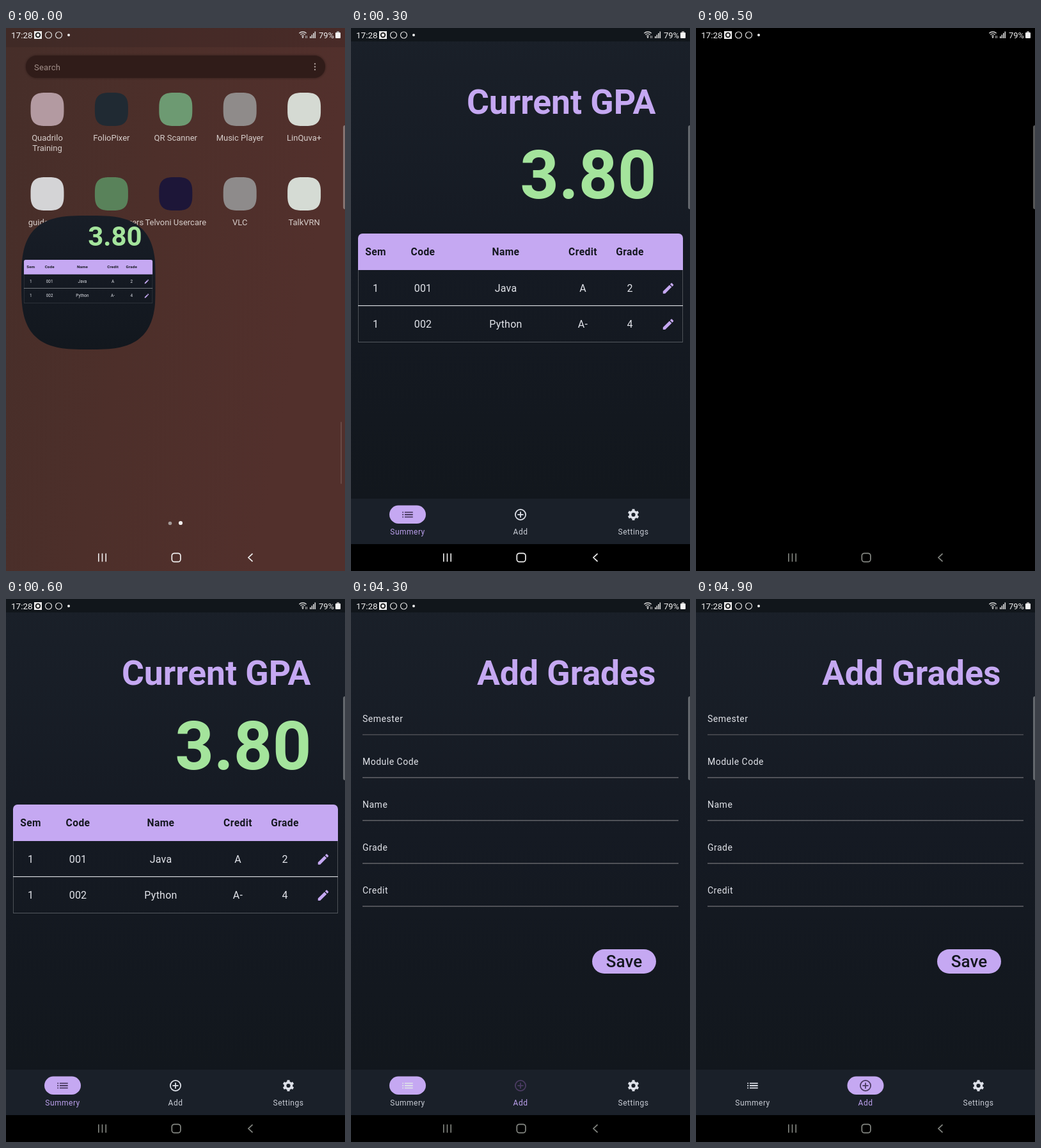
Write an HTML page with a canvas that moves like this. It is 530 px wide and 848 px high and loops after 5.3 s.

```html
<!DOCTYPE html>
<html lang="en">
<head>
<meta charset="utf-8">
<title>GPA calculator</title>
<style>
html, body { margin: 0; width: 100%; height: 100%; overflow: hidden; background: #000; }
canvas { display: block; width: 530px; height: 848px; }
</style>
</head>
<body>
<canvas id="stage"></canvas>
<script>
const W = 530, H = 848, LOOP = 5300, STEP = 100;
const LILAC = '#c5a8f2', GREEN = '#a4e49c', INK = '#14171f', PALE = '#dde0e8';
const canvas = document.getElementById('stage');
const ctx = canvas.getContext('2d');
const dpr = window.devicePixelRatio || 1;
canvas.width = W * dpr;
canvas.height = H * dpr;

const PENCIL = new Path2D('M3 17.25V21h3.75L17.8 9.94l-3.75-3.75zM20.7 7.04c.4-.4.4-1 0-1.4l-2.34-2.35c-.4-.4-1-.4-1.4 0l-1.84 1.83 3.75 3.75z');
const LIST = new Path2D('M3 7h2v2H3zM3 11h2v2H3zM3 15h2v2H3zM7 7h14v2H7zM7 11h14v2H7zM7 15h14v2H7z');

const TABS = ['Summery', 'Add', 'Settings'];
const tabX = i => 88.5 + 176.5 * i;
const COLS = [38.5, 112.5, 242, 362.5, 436];
const ROWS = [['1', '001', 'Java', 'A', '2'], ['1', '002', 'Python', 'A-', '4']];
const APPS = [
  ['Quadrilo\nTraining', '#b39aa1'], ['FolioPixer', '#202a33'], ['QR Scanner', '#6d9a72'],
  ['Music Player', '#8f8b8a'], ['LinQuva+', '#d5dad3'],
  ['guide_app', '#d4d4d6'], ['Meadow Rangers', '#59825a'], ['Telvoni Usercare', '#1d1638'],
  ['VLC', '#8e8b8b'], ['TalkVRN', '#d5dbd4']
];

const clamp = v => Math.max(0, Math.min(1, v));
const mix = (a, b, p) => a + (b - a) * p;
const easeOut = p => 1 - (1 - p) ** 3;

function rect(x, y, w, h, color) {
  ctx.fillStyle = color;
  ctx.fillRect(x, y, w, h);
}

function round(x, y, w, h, r, color) {
  ctx.fillStyle = color;
  ctx.beginPath();
  ctx.roundRect(x, y, w, h, r);
  ctx.fill();
}

// Superellipse outline; a higher power gives squarer corners.
function squircle(x, y, w, h, power) {
  const bend = v => Math.sign(v) * Math.abs(v) ** (2 / power);
  ctx.beginPath();
  for (let i = 0; i < 160; i++) {
    const a = i * Math.PI / 80;
    ctx.lineTo(x + w / 2 * (1 + bend(Math.cos(a))), y + h / 2 * (1 + bend(Math.sin(a))));
  }
  ctx.closePath();
}

function dot(x, y, r, color) {
  ctx.fillStyle = color;
  ctx.beginPath();
  ctx.arc(x, y, r, 0, Math.PI * 2);
  ctx.fill();
}

function ring(x, y, r, width, color, from = 0, to = Math.PI * 2) {
  ctx.strokeStyle = color;
  ctx.lineWidth = width;
  ctx.beginPath();
  ctx.arc(x, y, r, from, to);
  ctx.stroke();
}

function text(s, x, y, size, color, { weight = 400, align = 'center', gap = 0 } = {}) {
  ctx.font = `${weight} ${size}px Roboto, sans-serif`;
  ctx.letterSpacing = gap + 'px';
  ctx.textAlign = align;
  ctx.fillStyle = color;
  ctx.fillText(s, x, y);
}

const heading = s => text(s, 476.5, 134, 53.4, LILAC, { weight: 700, align: 'right' });

function icon(path, x, y, size, color) {
  ctx.save();
  ctx.translate(x - size / 2, y - size / 2);
  ctx.scale(size / 24, size / 24);
  ctx.fillStyle = color;
  ctx.fill(path);
  ctx.restore();
}

function gradient(x2, y2, ...colors) {
  const g = ctx.createLinearGradient(0, 0, x2, y2);
  colors.forEach((c, i) => g.addColorStop(i / (colors.length - 1), c));
  return g;
}

function gear(x, y, color) {
  ctx.fillStyle = color;
  ctx.beginPath();
  for (let i = 0; i < 6; i++) {
    const a = (i - 0.5) * Math.PI / 3;
    for (const [da, r] of [[-0.32, 6.8], [-0.22, 9], [0.22, 9], [0.32, 6.8]]) {
      ctx.lineTo(x + r * Math.cos(a + da), y + r * Math.sin(a + da));
    }
  }
  ctx.closePath();
  ctx.moveTo(x + 3.1, y);
  ctx.arc(x, y, 3.1, 0, Math.PI * 2, true);
  ctx.fill('evenodd');
}

function plusIcon(x, y, color) {
  ring(x, y, 8.1, 1.8, color);
  rect(x - 4.6, y - 0.9, 9.2, 1.8, color);
  rect(x - 0.9, y - 4.6, 1.8, 9.2, color);
}

function statusBar() {
  text('17:28', 8, 16, 13.5, '#f0f0f0', { align: 'left' });
  rect(44, 5, 12, 12, '#f0f0f0');
  dot(50, 11, 4.2, '#111');
  dot(50, 11, 2.4, '#f0f0f0');
  ring(66.5, 11, 5, 1.2, '#dcdcdc');
  ring(82.5, 11, 5, 1.2, '#dcdcdc');
  dot(98, 11, 2, '#f0f0f0');
  for (const r of [2.5, 5.5, 8.5]) ring(464, 14.5, r, 1.4, '#d8d8d8', -2.3, -0.84);
  dot(464, 14.5, 1.2, '#d8d8d8');
  rect(468, 12, 1, 4, '#aaa');
  rect(470, 12, 1, 4, '#aaa');
  for (let i = 0; i < 4; i++) rect(475 + i * 2.5, 13 - i * 2.5, 1.6, 3 + i * 2.5, '#d8d8d8');
  text('79%', 489, 16, 13, '#f0f0f0', { align: 'left' });
  round(515, 7, 8, 9, 1, '#f4f4f4');
  rect(517, 5, 4, 2, '#999');
}

function systemNav(color) {
  for (let i = 0; i < 3; i++) rect(144 + i * 5.7, 820.5, 1.6, 13, color);
  ctx.strokeStyle = color;
  ctx.lineWidth = 1.7;
  ctx.beginPath();
  ctx.roundRect(259.3, 820.3, 13.6, 13.4, 4);
  ctx.moveTo(385.5, 820.8);
  ctx.lineTo(379, 827);
  ctx.lineTo(385.5, 833.2);
  ctx.stroke();
}

function searchBar() {
  ctx.save();
  ctx.shadowColor = '#301c19';
  ctx.shadowBlur = 4 * dpr;
  round(31, 43, 468, 35, 17, '#301c19');
  ctx.restore();
  text('Search', 44, 66, 13, '#a28f89', { align: 'left', gap: 0.2 });
  for (const y of [56, 60.5, 65]) dot(483, y, 1.2, '#a89a96');
}

function launcher() {
  rect(0, 0, W, H, gradient(W, 100, '#462e29', '#4d2f2a', '#52302c'));
  rect(0, 0, W, 30, 'rgba(45, 30, 30, .25)');
  searchBar();
  APPS.forEach(([name, color], i) => {
    const x = 64.5 + 100.4 * (i % 5), y = 127 + 132 * Math.floor(i / 5);
    squircle(x - 26, y - 26, 52, 52, 3.1);
    ctx.fillStyle = color;
    ctx.fill();
    name.split('\n').forEach((line, k) => text(line, x, y + 49 + k * 16, 13, '#d6cdca'));
  });
  round(523, 615, 2, 97, 1, '#6a4a46');
  dot(256.5, 773.5, 2.8, '#a39a98');
  dot(273, 773, 3.1, '#f2efee');
}

function summaryPage() {
  heading('Current GPA');
  text('3.80', 477.5, 266, 106, GREEN, { weight: 700, align: 'right' });
  rect(11, 378, 1, 113, '#4d5157');
  rect(518, 378, 1, 113, '#4d5157');
  rect(11, 490, 508, 1, '#54595f');
  rect(11, 433, 508, 1.2, '#d5d8dc');
  round(11, 321, 508, 57, [7, 7, 0, 0], LILAC);
  ['Sem', 'Code', 'Name', 'Credit', 'Grade'].forEach((s, i) =>
    text(s, COLS[i], 354.5, 15.6, INK, { weight: 700, gap: 0.4 }));
  ROWS.forEach((row, r) => {
    const y = 411.7 + r * 56.3;
    row.forEach((s, i) => text(s, COLS[i], y, 16, '#e2e4ea', { gap: 0.25 }));
    icon(PENCIL, 496, y - 5.2, 22, LILAC);
  });
}

function addPage() {
  heading('Add Grades');
  ['Semester', 'Module Code', 'Name', 'Grade', 'Credit'].forEach((s, i) => {
    const y = 191.5 + i * 67;
    text(s, 18, y, 14, '#e0e2e8', { align: 'left', gap: 0.5 });
    rect(18, y + 19.8, 494, 1.2, i ? '#77767b' : '#5a5a60');
  });
  round(377, 547, 100, 38, 19, LILAC);
  text('Save', 427, 575, 26, INK, { weight: 500 });
}

function pill(tab, scale, alpha) {
  if (alpha <= 0) return;
  const w = 57 * scale;
  ctx.save();
  ctx.globalAlpha *= alpha;
  round(tabX(tab) - w / 2, 745.5, w, 28.5, Math.min(14.25, w / 2), LILAC);
  ctx.restore();
}

function tabBar(active, since) {
  rect(0, 735, W, 71, '#1a2029');
  if (active === 0) pill(0, 1, 1);
  else {
    pill(0, 1, 1 - since / 100);
    pill(1, mix(0.4, 1, easeOut(clamp(since / 500))), clamp(since / 100));
  }
  const shade = i => i === active ? '#4b3b62' : PALE;
  icon(LIST, tabX(0), 760, 22, shade(0));
  plusIcon(tabX(1), 760, shade(1));
  gear(tabX(2), 760, PALE);
  TABS.forEach((s, i) =>
    text(s, tabX(i), 790.5, 12, i === active ? '#bb9fec' : '#c8ccd5', { gap: 0.5 }));
}

function app(active, since) {
  rect(0, 0, W, H, gradient(0, 735, '#1a2029', '#151a23', '#12171d'));
  rect(0, 0, W, 21, '#11161b');
  if (active) addPage(); else summaryPage();
  tabBar(active, since);
  rect(0, 806, W, 42, '#000');
}

// The app window grows out of its launcher icon until it fills the screen.
function openingApp(p) {
  launcher();
  ctx.save();
  squircle(mix(24, 0, p), mix(293, 0, p), mix(210, W, p), mix(209, H, p), 3.1 / (1 - p));
  ctx.clip();
  ctx.translate(mix(23.6, 0, p), mix(235, 0, p));
  const s = mix(0.396, 1, p);
  ctx.scale(s, s);
  app(0, 0);
  ctx.restore();
}

function draw(ms) {
  const t = Math.floor(ms / STEP) * STEP;
  ctx.setTransform(dpr, 0, 0, dpr, 0, 0);
  if (t < 300) openingApp(easeOut(t / 300));
  else if (t < 4300) app(0, 0);
  else app(1, t - 4300);
  if (t >= 300 && t < 600) rect(0, 0, W, H, `rgba(0, 0, 0, ${clamp((t - 300) / 200)})`);
  round(527, 152, 6, 131, 3, 'rgba(205, 208, 208, .42)');
  statusBar();
  systemNav(t < 500 ? '#f0f0f0' : '#858883');
}

const start = performance.now();
function tick() {
  draw((performance.now() - start) % LOOP);
  requestAnimationFrame(tick);
}
tick();
</script>
</body>
</html>
```
